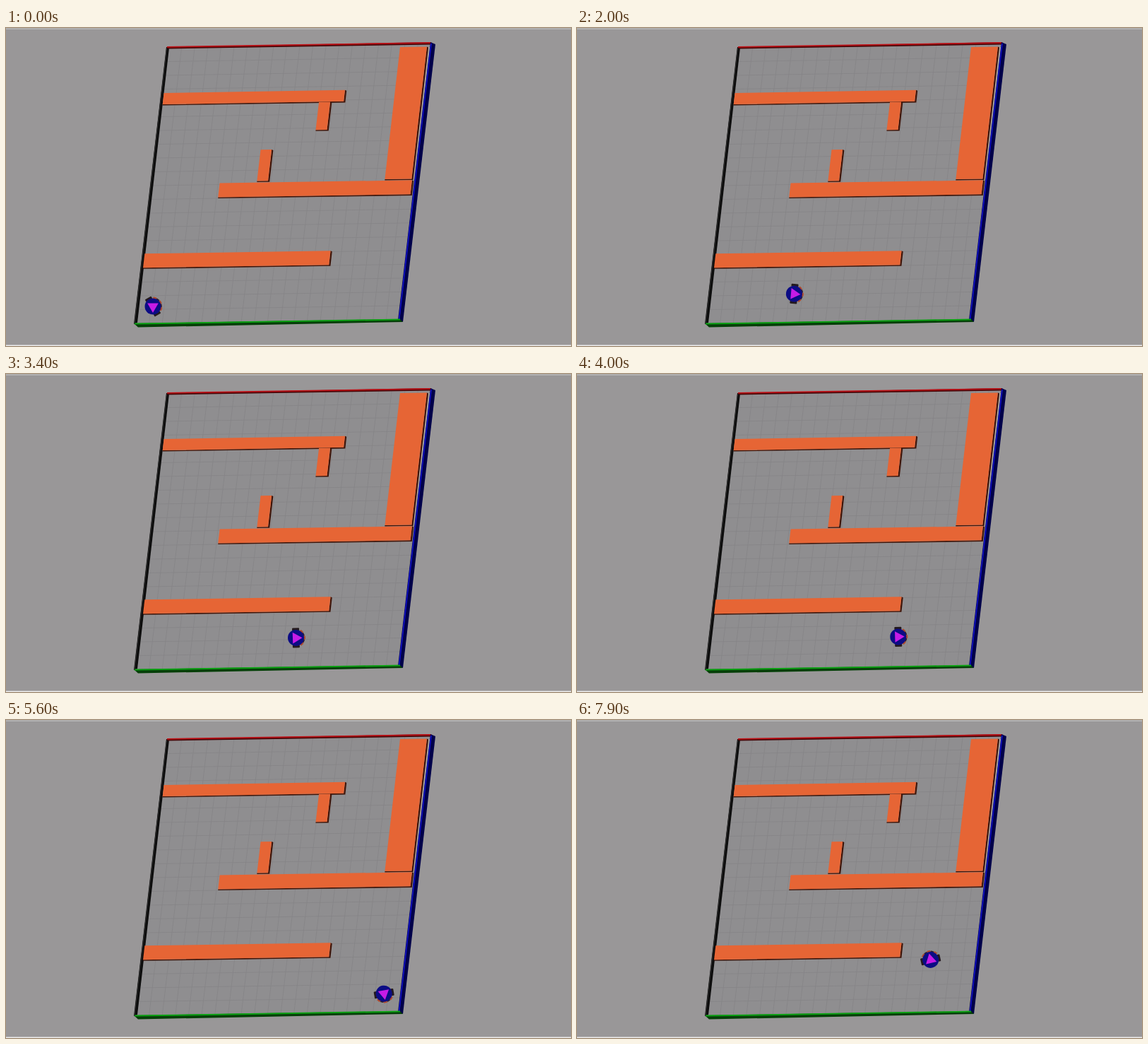
Recreate the animation shown at these times as an HTML page. Size 800 by 450 pixels, loop 8000 ms.

```html
<!DOCTYPE html>
<html lang="en">
<head>
<meta charset="utf-8">
<title>Robot in a maze</title>
<style>
html, body { margin: 0; width: 100%; height: 100%; overflow: hidden; background: #999798; }
svg { display: block; width: 800px; height: 450px; }
.side { fill: #401509; }
.top { fill: #e66535; }
#grid { stroke: #868587; stroke-width: .8; fill: none; }
</style>
</head>
<body>
<svg viewBox="0 0 800 450">
  <rect width="800" height="450" fill="#999798"/>
  <path d="M0 1.2H800" stroke="#c9c8c9"/>
  <path d="M0 449.3H800" stroke="#ececec" stroke-width="1.4"/>

  <path id="floor" fill="#8f8e90"/>
  <path id="grid"/>

  <!-- outer walls -->
  <path d="M227 27L231 28L186 417L181 419Z" fill="#0d0d0d"/>
  <path d="M227.5 29L182 418" stroke="#303030"/>
  <path d="M227 27L602 20L603 23.5L229 29.5Z" fill="#4a0508"/>
  <path d="M228 26.8L602 20.8" stroke="#bd1016" stroke-width="1.8"/>
  <path d="M599 27L577 215" stroke="#b3b2b4" stroke-width="1.4"/>
  <path d="M601 20L608 23L562 416L555 413Z" fill="#00004a"/>
  <path d="M602 22L556.500 413" stroke="#1010c0" stroke-width="1.8"/>
  <path d="M181 418L558 412L562 416L187 423.5Z" fill="#053f08"/>
  <path d="M182 418.600L558 412.600" stroke="#0ba012" stroke-width="2"/>

  <g id="blocks"></g>

  <g id="robot">
    <g id="parts"></g>
    <circle r="11.5" fill="#0c0c84"/>
    <path d="M9 0L-4.500 7.800V-7.800Z" fill="#c61be6"/>
  </g>
</svg>
<script>
const el = id => document.getElementById(id);
const mix = (a, b, k) => a.map((v, i) => v + (b[i] - v) * k);

// Floor coordinates (u to the right, v downwards, both 0 to 1) to the stage
const [tl, tr, br, bl] = [[230, 28], [602, 22], [557, 412.5], [184, 418]];
const onFloor = (u, v) => mix(mix(tl, tr, u), mix(bl, br, u), v);
el("floor").setAttribute("d", `M${tl}L${tr}L${br}L${bl}Z`);

const CELLS = 20;
let lines = "";
for (let i = 1; i < CELLS; i++) {
  const k = i / CELLS;
  lines += `M${onFloor(k, 0)}L${onFloor(k, 1)}M${onFloor(0, k)}L${onFloor(1, k)}`;
}
el("grid").setAttribute("d", lines);

// A block is a floor rectangle with dark right and lower sides
function block(u, v, w, h) {
  const a = onFloor(u, v), b = onFloor(u + w, v);
  const c = onFloor(u + w, v + h), d = onFloor(u, v + h);
  const shift = ([x, y], dx, dy) => [x + dx, y + dy];
  return `<path class="side" d="M${b}L${shift(b, 2.2, 1)}L${shift(c, 2.2, 1.6)}L${shift(d, 0, 1.6)}L${d}L${c}Z"/>` +
    `<path class="top" d="M${a}L${b}L${c}L${d}Z"/>`;
}
el("blocks").innerHTML =
  block(.003, .164, .689, .041) +
  block(.598, .206, .043, .101) +
  block(.397, .376, .042, .113) +
  block(.883, .011, .102, .479) +
  block(.256, .495, .731, .051) +
  block(.002, .747, .706, .051);

// Wheels at both sides, sensors at the front
const part = (angle, r, w, h, fill) =>
  `<rect x="${r - w / 2}" y="${-h / 2}" width="${w}" height="${h}" rx="1" fill="${fill}" transform="rotate(${angle})"/>`;
el("parts").innerHTML =
  [-90, 90].map(a => part(a, 12, 4, 10, "#241a1e")).join("") +
  [-24, 24].map(a => part(a, 11.5, 2.5, 5, "#33202a")).join("") +
  [-47, 0, 47].map(a => part(a, 11.9, 3, 5, "#b04a2c")).join("");

// Each leg is a steady drive: seconds, pixels forward, degrees turned
const legs = [
  [.25, 1, -7],
  [.55, 37, 0],
  [.3, 3, 42],
  [.9, 66.5, 0],
  [.2, 14.5, -7],
  [2.6, 192, 0],
  [.8, 30, 82],
  [1.3, 27.9, 140],
  [.35, 7.6, 37],
  [.65, 53.5, 0]
];
const LOOP = 8000, STEP = 100;
const rad = deg => deg * Math.PI / 180;

function pose(t) {
  let x = 208, y = 394, heading = -30;
  for (const [time, dist, turn] of legs) {
    const k = Math.min(Math.max(t / time, 0), 1);
    const half = turn * k / 2;
    // chord of the arc driven so far
    const chord = dist * k * (half ? Math.sin(rad(half)) / rad(half) : 1);
    x += chord * Math.cos(rad(heading + half));
    y += chord * Math.sin(rad(heading + half));
    heading += turn * k;
    t -= time;
  }
  return { x, y, heading };
}

function draw(now) {
  const ms = Math.floor((now % LOOP) / STEP) * STEP;
  const { x, y, heading } = pose(ms / 1000);
  el("robot").setAttribute("transform", `translate(${x} ${y}) rotate(${heading})`);
}

let start;
function tick(now) {
  start ??= now;
  draw(now - start);
  requestAnimationFrame(tick);
}
draw(0);
requestAnimationFrame(tick);
</script>
</body>
</html>
```
